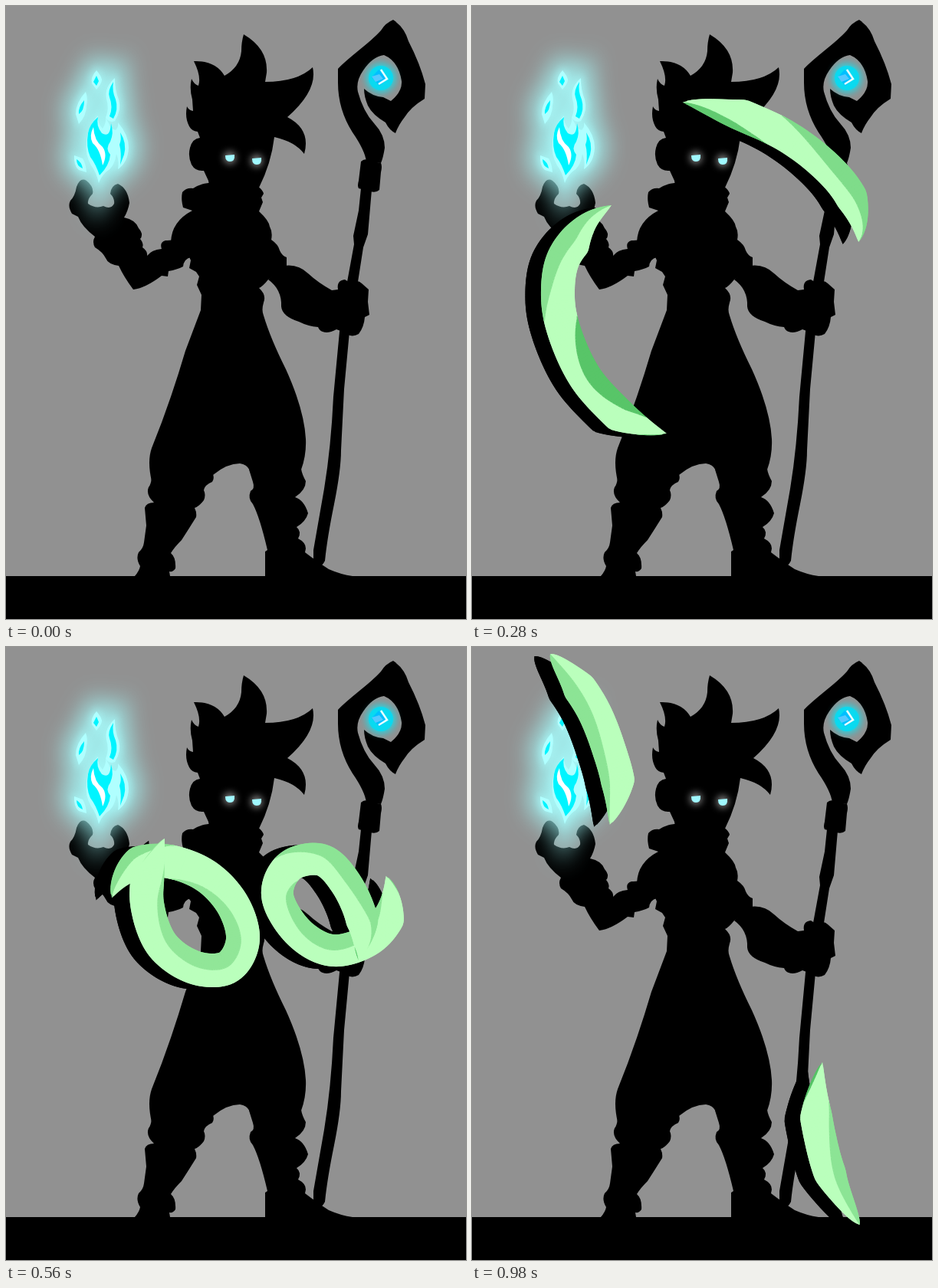
Write an HTML page with a canvas that moves like this. It is 600 px wide and 800 px high and loops after 1.05 s.

```html
<!DOCTYPE html>
<html lang="en">
<head>
<meta charset="utf-8">
<title>Ribbon spell</title>
<style>
html, body { margin: 0; width: 100%; height: 100%; overflow: hidden; background: #919191; }
svg, canvas { position: absolute; left: 0; top: 0; width: 600px; height: 800px; display: block; }
</style>
</head>
<body>
<svg viewBox="0 0 600 800">
  <defs>
    <filter id="wide" x="-100%" y="-100%" width="300%" height="300%"><feGaussianBlur stdDeviation="15"/></filter>
    <filter id="near" x="-100%" y="-100%" width="300%" height="300%"><feGaussianBlur stdDeviation="5"/></filter>
    <g id="tongues">
      <path d="M121 231Q118 217 111 208Q103 194 105 178Q106 157 120 143Q119 153 126 160Q131 152 130 146L134 153Q136 160 143 162Q147 158 146 152Q160 168 160 185Q159 204 146 213Q148 203 144 193Q142 210 130 217Q124 223 121 231Z"/>
      <path d="M142 94Q128 106 131 121Q135 134 130 146Q135 153 142 150Q151 136 147 122Q142 110 142 94Z"/>
      <path d="M118 84Q110 93 112 101L118 109Q125 101 125 96Q124 91 118 84Z"/>
      <path d="M104 112Q91 126 91 141L95 154Q105 143 105 130Q107 121 104 112Z"/>
      <path d="M89 195Q88 208 95 214L105 217Q104 205 100 199Z"/>
    </g>
  </defs>
  <rect width="600" height="800" fill="#919191"/>
  <g id="figure">
    <path d="M0 744H600V800H0Z"/>
    <!-- head -->
    <path d="M266 240L264 228L258 215Q247 216 242 207Q237 196 240 185Q243 173 253 172L250 164Q242 163 239 157Q233 146 236 131Q238 136 244 137L243 122Q239 108 242 95Q245 102 251 104Q255 92 245 72Q273 71 285 91Q305 80 307 59Q307 47 310 37Q342 56 340 87L338 99Q380 99 400 80Q407 110 367 145Q398 161 389 193Q377 177 350 171Q346 205 330 237L328 245Z"/>
    <!-- torso and robe -->
    <path d="M243 267L231 263Q228 252 230 243Q235 237 244 238Q253 232 264 231L328 235Q335 240 336 245L333 250L335 256L330 268Q343 280 344 288Q348 295 346 305Q355 311 357 319Q360 326 366 328L366 340L342 357Q335 366 330 368Q340 377 336 387Q333 397 336 404Q345 434 365 474Q389 527 391 565Q392 586 385 605L318 606Q314 598 305 597Q288 597 270 612L190 620Q184 594 190 577Q214 518 234 450L254 397L255 377L249 364L252 353L248 347L239 342L241 332Q237 326 240 318L215 308Q216 281 243 267Z"/>
    <!-- raised arm -->
    <path d="M241 328Q232 330 231 340Q223 344 212 346L211 353L203 352Q182 368 166 370Q154 354 147 339Q133 337 130 329Q126 321 116 315Q112 308 116 301Q99 288 94 275L86 271Q80 261 84 254Q90 248 92 236Q97 223 105 228Q115 236 113 245Q106 252 107 258Q117 265 127 261Q137 266 141 258Q142 251 136 245Q137 234 146 232Q159 238 161 257Q159 268 154 276Q169 279 173 290Q180 298 175 304Q180 310 178 315Q185 320 184 326Q190 318 203 317Q200 308 208 306Q222 307 230 298L245 310Z"/>
    <!-- staff arm -->
    <path d="M362 339Q381 336 394 349Q407 361 425 371L433 370Q431 358 442 357L450 362Q458 356 464 362L473 370L472 386L474 403L468 406Q467 419 460 428Q450 434 439 425L431 422Q420 428 413 425Q409 424 407 419Q394 418 382 412Q360 405 359 392Q360 370 342 357Z"/>
    <!-- legs -->
    <path d="M270 611Q272 617 269 621Q259 625 258 632Q261 638 258 645Q252 653 246 655Q249 661 248 667Q238 683 229 697Q219 707 215 714Q222 720 221 734Q218 739 213 738L214 744H168Q174 737 175 731Q169 721 173 713Q179 708 180 700L183 678L181 655Q183 648 193 648Q182 638 186 628Q189 625 190 615L200 590Z"/>
    <path d="M385 604Q386 611 391 620Q391 632 377 641Q389 645 394 662Q391 673 379 680Q386 686 381 695Q391 700 391 708L390 713Q407 726 421 735Q437 742 452 744H338L338 712L341 710Q331 667 322 650Q315 643 319 633Q325 630 322 621L317 605Z"/>
    <!-- staff -->
    <path d="M470 203Q468 188 452 165Q433 135 433 100L433 82Q438 76 460 58Q480 42 489 32Q495 22 505 18Q520 28 525 46Q540 75 547 102L546 121Q528 132 520 145Q512 155 508 166Q500 162 495 152Q478 142 472 130Q467 118 467 108Q478 118 492 119L502 124Q517 112 516 98Q512 72 493 64Q478 66 466 84Q456 98 459 112Q466 138 480 153Q494 168 494 185Q492 198 489 205Z"/>
    <path d="M463 203Q468 198 474 202L489 205Q491 209 489 217L487 240Q483 244 475 242L460 238Q458 235 460 228Z"/>
    <path d="M463 238L460 267L453 300L454 311L445 360L435 425L427 510Q424 575 415 630L401 710V722Q409 738 416 724Q419 694 428 650Q437 605 437 580L441 500L448 425L459 360L466 315L472 298L477 240Z"/>
  </g>
  <!-- flame -->
  <g filter="url(#wide)" opacity=".8"><use href="#tongues" fill="#a4ffff" stroke="#a4ffff" stroke-width="30"/></g>
  <g filter="url(#near)" opacity=".5"><use href="#tongues" fill="#aff" stroke="#aff" stroke-width="6"/></g>
  <use href="#tongues" fill="#b0ffff"/>
  <g fill="#00f4ff">
    <path d="M120 145Q117 156 125 166Q136 173 137 153Q141 166 136 177Q129 186 136 194Q135 208 122 221Q117 206 110 197Q104 184 107 166Q109 154 120 145Z"/>
    <path d="M140 99Q132 111 135 119Q140 132 135 144L140 147Q147 135 143 122Q138 111 140 99Z"/>
    <path d="M149 165Q158 179 154 194L149 207Q151 192 148 181Q151 174 149 165Z"/>
    <path d="M118 91L114 99L118 104L121 98Z"/>
    <path d="M102 123Q94 132 95 141Q102 137 102 123Z"/>
    <path d="M92 200Q92 209 100 212Q99 204 92 200Z"/>
  </g>
  <path d="M114 158Q108 170 113 179Q123 187 126 208Q133 194 126 184Q115 176 114 158Z" fill="#fff"/>
  <!-- eyes -->
  <g filter="url(#near)" fill="#fff" opacity=".5"><circle cx="292" cy="198" r="8"/><circle cx="327" cy="202" r="8"/></g>
  <path id="eye" d="M286 195L298 194Q299 203 292 203Q286 203 286 195Z" fill="#a0f8ff"/>
  <use href="#eye" x="35" y="4"/>
  <!-- gem -->
  <circle cx="489" cy="94" r="19" fill="#0ef" filter="url(#near)" opacity=".75"/>
  <circle cx="489" cy="94" r="16" fill="#00dcf5" opacity=".8"/>
  <path d="M486 83L498 95L487 104L477 93Z" fill="#00bfff"/>
  <path d="M477 92L487 89L492 95L482 99Z" fill="#56c8ff"/>
  <path d="M489 83L497 95L486 102" fill="none" stroke="#e8ffff" stroke-width="2.6"/>
</svg>
<canvas id="spell" width="600" height="800"></canvas>
<script>
const STEP = 70, STEPS = 15, TAPER = 1.1;
const ctx = document.getElementById('spell').getContext('2d');
const mix = (a, b, t) => a + (b - a) * t;
const clamp = (v, lo, hi) => Math.max(lo, Math.min(hi, v));

// spine: points the ribbon flies through, as "x,y".
// folds: where the shaded face changes sides, and how dark it is before that.
// keys: step, tail and head along the spine, lean of the head tip.
const upper = {
  spine: '76,56 150,62 215,80 280,106 340,137 405,167 455,203 492,245 510,295 503,345 474,382 425,396 381,372 354,325 370,286 412,278 443,308 464,355 465,400 456,450 446,515 445,580 454,640 470,695 502,756',
  width: 42, side: -1,
  folds: [[0, 0], [4.8, .6], [8.5, .25], [13.8, .1], [17.8, .1], [21.2, .75], [27, .1]],
  keys: [[1, 0, 3, .7], [2, 1.45, 5.05, .9], [4, 3.05, 8.25, .65], [6, 5.25, 12.8, .5],
    [8, 8.05, 18.2, .6], [12, 14, 23.55, 0], [14, 20.4, 24, .4]]
};
const lower = {
  spine: '540,733 482,722 426,698 378,666 328,632 276,598 228,565 187,529 148,485 122,430 112,380 120,328 156,289 205,279 258,297 295,335 309,382 289,418 245,418 203,388 184,335 187,282 193,230 191,180 178,132 160,86 136,48 102,9',
  width: 44, side: 1,
  folds: [[0, 0], [6.3, .5], [9.4, .7], [13.2, .15], [21, .05], [33, .1]],
  keys: [[1, 0, 4, .6], [2, 1.8, 6.85, .8], [4, 5.7, 12.6, .05], [6, 8.25, 17.15, .4],
    [8, 11.2, 21.65, .85], [12, 18, 26.85, .4], [14, 21.95, 27, .5]]
};
for (const r of [upper, lower]) r.spine = r.spine.split(' ').map(p => p.split(',').map(Number));

// Linear lookup in rows whose first value is the position.
function lookup(rows, x) {
  const i = clamp(rows.findIndex(r => r[0] >= x), 1, rows.length - 1);
  const a = rows[i - 1], b = rows[i];
  const t = clamp((x - a[0]) / (b[0] - a[0]), 0, 1);
  return a.map((v, k) => mix(v, b[k], t));
}

// Point on a smooth curve through the spine.
function spineAt(spine, u) {
  const last = spine.length - 1;
  const i = clamp(Math.floor(u), 0, last - 1), t = u - i;
  const [a, b, c, d] = [-1, 0, 1, 2].map(n => spine[clamp(i + n, 0, last)]);
  return [0, 1].map(k => b[k] + t / 2 * (c[k] - a[k]
    + t * (2 * a[k] - 5 * b[k] + 4 * c[k] - d[k] + t * (3 * (b[k] - c[k]) + d[k] - a[k]))));
}

// The shaded face swells and shrinks between two turns of the ribbon.
function foldAt({ folds, side }, u) {
  const i = clamp(folds.findIndex(f => f[0] > u), 1, folds.length - 1);
  const from = folds[i - 1][0], [to, dark] = folds[i];
  const share = .5 * Math.sin(Math.PI * (u - from) / (to - from));
  const outer = side * (i % 2 ? 1 : -1) > 0;
  const shade = `rgb(${mix(149, 62, dark)},${mix(233, 182, dark)},${mix(156, 82, dark)})`;
  return { share, outer, shade };
}

// Cross sections from tail to head; across(0) is the outer edge, across(1) the inner.
function slices(ribbon, step) {
  const [, tail, head, lean] = lookup(ribbon.keys, step);
  const tailLean = 1 - .8 * (step / 14) ** 3;
  const count = Math.ceil((head - tail) * 14), out = [];
  for (let n = 0; n <= count; n++) {
    const u = mix(tail, head, n / count);
    const open = clamp((u - tail) / TAPER, 0, 1) ** .8;
    const shut = clamp((head - u) / TAPER, 0, 1) ** .8;
    const [x, y] = spineAt(ribbon.spine, u);
    const [x0, y0] = spineAt(ribbon.spine, u - .02), [x1, y1] = spineAt(ribbon.spine, u + .02);
    const dx = x1 - x0, dy = y1 - y0, scale = ribbon.width / Math.hypot(dx, dy);
    const across = edge => {
      const off = (.5 - mix(lean, mix(tailLean, edge, open), shut)) * scale;
      return [x + dy * off, y - dx * off];
    };
    out.push({ across, ...foldAt(ribbon, u) });
  }
  return out;
}

function band(a, b, a0, a1, b0, b1, color) {
  ctx.fillStyle = color;
  ctx.beginPath();
  for (const p of [a.across(a0), b.across(b0), b.across(b1), a.across(a1)]) ctx.lineTo(...p);
  ctx.fill();
}

// Each piece overlaps the next one, which hides the seams.
function paint(list, shadow) {
  for (let i = 0; i < list.length - 1; i++) {
    const a = list[i], b = list[Math.min(i + 2, list.length - 1)];
    if (shadow) {
      band(a, b, 0, 1, 0, 1, '#000');
      continue;
    }
    const near = a.outer ? 0 : 1, far = 1 - near;
    const shareB = a.outer === b.outer ? b.share : 0;
    const crease = share => mix(near, far, share);
    band(a, b, crease(Math.max(0, a.share - .03)), far, crease(Math.max(0, shareB - .03)), far, '#baffbc');
    band(a, b, near, crease(a.share), near, crease(shareB), a.shade);
  }
}

function draw(step) {
  ctx.clearRect(0, 0, 600, 800);
  if (step < 1) return;
  const ribbons = [upper, lower].map(r => slices(r, step));
  ctx.save();
  ctx.translate(-20.5, 3);
  ribbons.forEach(r => paint(r, true));
  ctx.restore();
  ribbons.forEach(r => paint(r, false));
}

let shown = -1;
const start = performance.now();
function tick() {
  const step = Math.floor((performance.now() - start) / STEP) % STEPS;
  if (step !== shown) draw(step);
  shown = step;
  requestAnimationFrame(tick);
}
tick();
</script>
</body>
</html>
```
